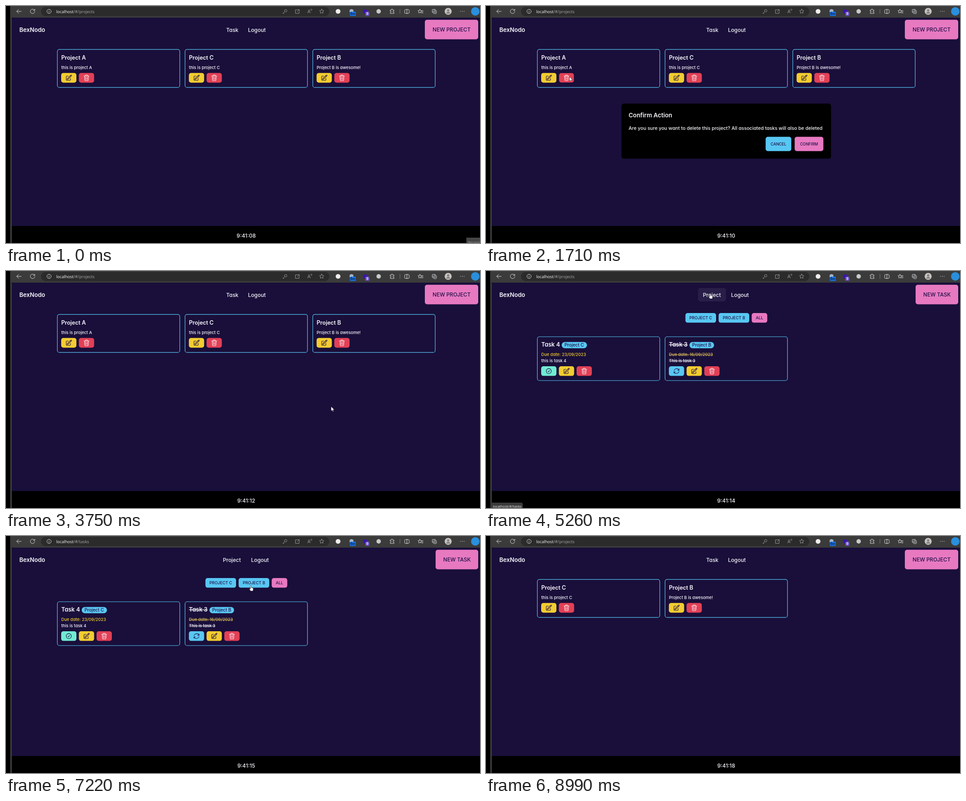
Recreate the animation shown at these times as an HTML page. Size 1057x530 px, loop 9790 ms.

```html
<!DOCTYPE html>
<html lang="en">
<head>
<meta charset="utf-8">
<title>Project board</title>
<style>
  html, body { margin: 0; width: 100%; height: 100%; overflow: hidden; background: #000; }
  svg { display: block; width: 1057px; height: 530px; }
  text { font-family: Inter, Lato, sans-serif; font-feature-settings: "cv11"; white-space: pre; }
  .ui { font-family: "Open Sans", "Noto Sans", sans-serif; }
  .line { fill: none; stroke-linecap: round; stroke-linejoin: round; }
  .done { text-decoration: line-through; }
</style>
</head>
<body>
<svg id="stage" viewBox="0 0 1057 530"></svg>
<script>
const LOOP = 9790;
const C = {
  bg: '#190f3a', bar: '#3b3b3b', pill: '#2b2b2b', pink: '#e779c1', blue: '#58c7f3',
  yellow: '#f3cc30', red: '#e24056', green: '#71ead2', ink: '#201047', white: '#f9f7fd'
};

// Markup helpers
const rect = (x, y, w, h, r, fill, more = '') =>
  `<rect x="${x}" y="${y}" width="${w}" height="${h}" rx="${r}" fill="${fill}" ${more}/>`;
const circle = (x, y, r, fill, more = '') => `<circle cx="${x}" cy="${y}" r="${r}" fill="${fill}" ${more}/>`;
const text = (x, y, s, size, weight = 500, fill = C.white, more = '') =>
  `<text x="${x}" y="${y}" font-size="${size}" font-weight="${weight}" fill="${fill}" ${more}>${s}</text>`;
const mid = (x, y, s, size, weight, fill, more = '') =>
  text(x, y, s, size, weight, fill, 'text-anchor="middle" ' + more);
const path = (d, stroke, width = 1, more = '') =>
  `<path class="line" d="${d}" stroke="${stroke}" stroke-width="${width}" ${more}/>`;
const group = (id, body, hidden = true) =>
  `<g id="${id}"${hidden ? ' display="none"' : ''}>${body}</g>`;

// Icons on a 24 unit grid
const ICON = {
  edit: 'M16.9 4.5l1.7-1.7a1.9 1.9 0 112.6 2.6L10.6 16a4.5 4.5 0 01-1.9 1.2L6 18l.8-2.7a4.5 4.5 0 011.1-1.9zM16.9 4.5l2.6 2.6M18 14v4.7A2.3 2.3 0 0115.7 21H5.3A2.3 2.3 0 013 18.7V8.3A2.3 2.3 0 015.3 6H10',
  trash: 'M3 5.5H21M8 5.5V4Q8 2 10 2H14Q16 2 16 4V5.5M5 5.5L6 20Q6.2 22 8 22H16Q17.8 22 18 20L19 5.5M9.3 9L9.7 18M14.7 9L14.3 18',
  check: 'M9 12.7L11.2 15L15 9.8M21 12a9 9 0 11-18 0 9 9 0 0118 0z',
  cycle: 'M16 9.3h5V4.5M21 9.3A9 9 0 005 7.5L3 10M8 14.7H3v4.8M3 14.7a9 9 0 0016 1.8L21 14'
};
const icon = (name, x, y, color) =>
  path(ICON[name], color, 1.7, `transform="translate(${x - 7.6} ${y - 7.6}) scale(.635)"`);
const iconButton = (x, y, fill, name, color = C.ink, id = '') =>
  `<g ${id && `id="${id}"`}>${rect(x, y, 34, 21.6, 5, fill)}${icon(name, x + 17, y + 10.8, color)}</g>`;
const cardBox = (x, y, h) => rect(x, y, 273, h, 4.5, 'none', `stroke="${C.blue}" stroke-width="1.2"`);

function projectCard(col, name, note, id) {
  const x = 114.5 + col * 284.8;
  return cardBox(x, 97.2, 85) +
    text(x + 8.7, 119.5, name, 12.5, 600) +
    text(x + 8.7, 141, note, 9.3) +
    iconButton(x + 8.5, 149.8, C.yellow, 'edit') +
    iconButton(x + 48, 149.8, C.red, 'trash', C.white, id);
}

function taskCard(col, name, tag, due, note, done) {
  const x = 114.5 + col * 284.8, cls = done ? 'class="done"' : '';
  return cardBox(x, 147, 98) +
    text(x + 8.7, 169, name, 12.9, 600, C.white, cls) +
    rect(x + 54.3, 158.7, done ? 55 : 56.3, 14, 7, C.blue) +
    text(x + 60.5, 169.3, tag, 9.9, 500, C.ink) +
    text(x + 8.7, 190.3, due, 9.4, 500, done ? '#d8b957' : C.yellow, cls) +
    text(x + 8.7, 204, note, 9.3, 500, C.white, cls) +
    (done ? iconButton(x + 8.5, 213, C.blue, 'cycle') : iconButton(x + 8.5, 213, C.green, 'check')) +
    iconButton(x + 48, 213, C.yellow, 'edit') +
    iconButton(x + 87.5, 213, C.red, 'trash', C.white);
}

const bigButton = (x, label) =>
  rect(x, 30.8, 1053 - x, 43.6, 5, C.pink) + mid((x + 1053) / 2 + .2, 57, label, 11.7, 500, C.ink);
const nav = (x, label, x2) => text(x, 57.7, label, 11.9) + text(x2, 57.7, 'Logout', 11.9);
const chip = (x, w, label, fill) =>
  rect(x, 94, w, 21.6, 5, fill) + mid(x + w / 2, 108.2, label, 9, 500, C.ink);
const popButton = (x, w, label, fill) =>
  `<g class="pop" data-x="${x + w / 2}" data-y="308.5">${rect(x, 292, w, 33, 5, fill)}` +
  mid(x + w / 2, 311.8, label, 8.8, 500, C.ink) + '</g>';

function toolbar() {
  const w = '#d8d8d8', g = '#999';
  return rect(0, 0, 1057, 26, 0, C.bar) + rect(0, 0, 9.5, 530, 0, '#000') + rect(9.5, 0, 3.5, 530, 0, C.bar) +
    path('M34 12H24M28.2 7.6L23.8 12L28.2 16.4', w) +
    path('M63.6 9.5A5 5 0 1 0 64.2 12.5M64.2 7V10H61', w) +
    rect(78, 2, 643, 20.5, 10, C.pill) +
    circle(96, 12, 4.7, 'none', `stroke="${w}"`) + path('M96 11.6V14.4M96 9.6V9.7', w) +
    `<text class="ui" x="112" y="15.5" font-size="9.2" fill="#fff">localhost<tspan id="url" fill="#aaa"></tspan></text>` +
    circle(623.7, 10.5, 2.7, 'none', `stroke="${g}"`) + path('M621.6 12.6L617.5 16.5H619.8', g) +
    path('M649 8.5H645.5V16.5H653.5V13M650 8H654V12M653.6 8.4L649.5 12.5', g) +
    text(672, 16, 'A', 10.5, 400, g) + path('M679.5 7Q681 8.5 679.5 10M681.4 6.3Q683.4 8.5 681.4 10.7', g, .8) +
    path(star(704, 12, 5.3), g) +
    circle(740.5, 12, 5.3, '#f1eeee') +
    circle(770.5, 11.5, 4.5, '#a9b4c2') + rect(767, 12.8, 13, 9.5, 1.5, '#1a73e8') +
    mid(773.5, 20.2, '6m', 7, 600, '#0b1c33') +
    rect(796.5, 8, 8.5, 8.5, 0, '#3a16a8') + rect(801.3, 12.8, 9, 9, 1.5, '#6a4fc0') + mid(805.8, 20, '9', 7, 600, '#fff') +
    circle(831, 12, 4.9, '#c9c9c9') +
    path('M857 9H859.4Q858.7 6.7 860.9 6.7Q863 6.7 862.4 9H865.2V11.3Q862.8 10.8 862.8 12.7Q862.8 14.6 865.2 14V16.7H857V14Q859 14.3 859 12.7Q859 11 857 11.3Z', w) +
    rect(878, 7, 1, 10, 0, '#777') +
    rect(889, 8, 10, 8.5, 1.5, 'none', `stroke="${w}"`) + path('M894 7V17.5', w) +
    path(star(923, 12, 4.6), w) + path('M926 10.5H930M927 13H930M927.5 15.5H930', w) +
    rect(950.5, 7.5, 7, 7, 1.5, 'none', `stroke="${w}"`) +
    rect(953, 10, 7, 7, 1.5, C.bar, `stroke="${w}"`) + path('M956.5 11.8V15.2M954.8 13.5H958.2', w, .8) +
    circle(986, 12, 7.8, '#c9c5c3') + circle(986, 9.8, 2.6, '#858180') +
    path('M982 16.5Q982 13.4 986 13.4Q990 13.4 990 16.5Z', '#858180', 1, 'style="fill:#858180"') +
    [1013.5, 1017.5, 1021.5].map(x => circle(x, 12, .8, w)).join('') +
    circle(1046.5, 12, 9.5, '#2a8fdc');
}

function star(x, y, r) {
  const points = Array.from({ length: 10 }, (_, i) => {
    const a = i * Math.PI / 5 - Math.PI / 2, k = i % 2 ? r * .48 : r;
    return `${(x + k * Math.cos(a)).toFixed(2)} ${(y + k * Math.sin(a)).toFixed(2)}`;
  });
  return 'M' + points.join('L') + 'Z';
}

const stage = document.getElementById('stage');
stage.innerHTML = toolbar() +
  `<path d="M13 530V30Q13 26 17 26H1057V530Z" fill="${C.bg}"/>` +
  rect(13, 492, 1044, 38, 0, '#000') +
  text(29.7, 58, 'BexNodo', 13.1, 600) +
  rect(0, 38, 0, 30, 5, '#281e48', 'id="hover"') +
  group('home', nav(491, 'Task', 539.7) + bigButton(934, 'NEW PROJECT')) +
  group('three', projectCard(0, 'Project A', 'this is project A', 'bin') +
    projectCard(1, 'Project C', 'this is project C') + projectCard(2, 'Project B', 'Project B is awesome!')) +
  group('two', projectCard(0, 'Project C', 'this is project C') + projectCard(1, 'Project B', 'Project B is awesome!')) +
  group('tasks', nav(483.7, 'Project', 546.5) + bigButton(958, 'NEW TASK') +
    chip(444.7, 68.3, 'PROJECT C', C.blue) + chip(518.7, 68.3, 'PROJECT B', C.blue) + chip(592.5, 34.7, 'ALL', C.pink) +
    taskCard(0, 'Task 4', 'Project C', 'Due date: 23/09/2023', 'this is task 4', false) +
    taskCard(1, 'Task 3', 'Project B', 'Due date: 16/09/2023', 'This is task 3', true)) +
  group('modal', rect(302, 218.3, 467.5, 123, 5.5, '#000') +
    text(318, 249.3, 'Confirm Action', 13.3, 600) +
    text(318, 276.7, 'Are you sure you want to delete this project? All associated tasks will also be deleted', 10.65) +
    popButton(622.7, 59, 'CANCEL', C.blue) + popButton(687.3, 66, 'CONFIRM', C.pink)) +
  mid(535.7, 518, '', 12, 500, C.white, 'id="clock"') +
  group('status', '<path id="tab" fill="#3b3b3b"/>' +
    '<text id="link" class="ui" x="15.5" y="528.5" font-size="8" fill="#eee"></text>') +
  group('record', rect(1026.5, 518, 31, 12, 0, '#454545') +
    text(1030, 530.5, 'Record', 7.8, 400, '#999', 'class="ui"')) +
  group('arrow', '<path d="M0 0V10.2L2.4 8L4 11.6L5.6 10.9L4 7.4H7.2Z" fill="#fff" stroke="#111" stroke-width=".6"/>') +
  group('hand', '<path d="M-1 .4Q0-1.2 1 .4V4.6L4.6 5.4Q5.7 5.8 5.5 7L4.7 12H-.6L-3.4 7.6Q-3.6 6.2-2.2 6.6L-1 7.8Z" fill="#fff" stroke="#111" stroke-width=".6"/>');

const $ = id => document.getElementById(id);
const show = (id, on) => on ? $(id).removeAttribute('display') : $(id).setAttribute('display', 'none');
const pops = [...stage.querySelectorAll('.pop')];

// Pointer route: time, x, y
const ROUTE = [
  [380, 905, 540], [800, 560, 370], [1380, 186, 158], [1720, 186, 158], [2100, 420, 215],
  [2540, 775, 262], [2880, 727, 299], [3020, 725, 303], [3900, 725, 303], [4450, 610, 170],
  [4880, 500, 51], [5280, 500, 50], [5550, 550, 52], [5800, 560, 62], [5990, 480, 100],
  [6300, 168, 205], [6700, 600, 130], [6930, 575, 118], [7180, 546, 111], [7260, 546, 111],
  [7500, 572, 125], [7910, 492, 74], [8000, 500, 54], [8200, 500, 54], [8450, 588, 240], [8720, 650, 540]
];
const TICKS = [290, 1290, 2290, 3300, 4300, 5230, 6230, 7260, 8000, 8990];

// Clickable areas: x, y, width, height; the first two are nav links
const HOT = {
  home: [[480, 38, 49, 30], [529, 38, 63, 30], [123, 150, 74, 22], [408, 150, 74, 22], [934, 31, 119, 44]],
  tasks: [[473, 38, 62, 30], [535.5, 38, 62, 30], [445, 94, 68, 22], [519, 94, 68, 22], [593, 94, 34, 22],
    [123, 213, 113, 22], [408, 213, 113, 22]],
  modal: [[623, 292, 59, 33], [687, 292, 66, 33]]
};

function pointerAt(t) {
  const i = ROUTE.findIndex(p => p[0] > t);
  if (i < 1) return null;
  const [t0, x0, y0] = ROUTE[i - 1], [t1, x1, y1] = ROUTE[i];
  const k = (t - t0) / (t1 - t0);
  return [x0 + (x1 - x0) * k, y0 + (y1 - y0) * k];
}

const scaleAt = (x, y, s) => `translate(${x} ${y}) scale(${s}) translate(${-x} ${-y})`;
const between = (t, a, b) => t >= a && t < b;

function draw(t) {
  const tasks = between(t, 5130, 8130), modal = between(t, 1650, 3680);
  show('home', !tasks);
  show('tasks', tasks);
  show('three', t < 3820);
  show('two', !tasks && t >= 3820);
  show('modal', modal);
  show('record', t < 70);

  $('url').textContent = between(t, 5330, 8200) ? '/#/tasks' : '/#/projects';
  const second = 8 + TICKS.filter(tick => tick <= t).length;
  $('clock').textContent = '9:41:' + String(second).padStart(2, '0');

  $('bin').setAttribute('transform', scaleAt(179.5, 160.6, between(t, 1580, 1780) ? .97 : 1));
  const grow = Math.min(1, .97 + Math.max(0, t - 1710) / 140 * .03);
  pops.forEach(p => p.setAttribute('transform', scaleAt(p.dataset.x, p.dataset.y, grow)));

  const first = between(t, 4850, 5750), last = between(t, 7980, 8600);
  show('status', first || last);
  $('link').textContent = 'localhost/#/' + (last ? 'projects' : 'tasks');
  $('tab').setAttribute('d', `M12 530V518H${last ? 89 : 78}q4 0 4 4V530Z`);

  const pos = pointerAt(t);
  const areas = HOT[modal ? 'modal' : tasks ? 'tasks' : 'home'];
  const hit = pos ? areas.findIndex(([x, y, w, h]) =>
    between(pos[0], x, x + w) && between(pos[1], y, y + h)) : -1;
  const onNav = !modal && (hit === 0 || hit === 1);
  $('hover').setAttribute('x', onNav ? areas[hit][0] : 0);
  $('hover').setAttribute('width', onNav ? areas[hit][2] : 0);
  show('arrow', pos && hit < 0);
  show('hand', pos && hit >= 0);
  if (pos) $(hit < 0 ? 'arrow' : 'hand').setAttribute('transform', `translate(${pos})`);
}

const start = performance.now();
function frame() {
  draw((performance.now() - start) % LOOP);
  requestAnimationFrame(frame);
}
frame();
</script>
</body>
</html>
```
